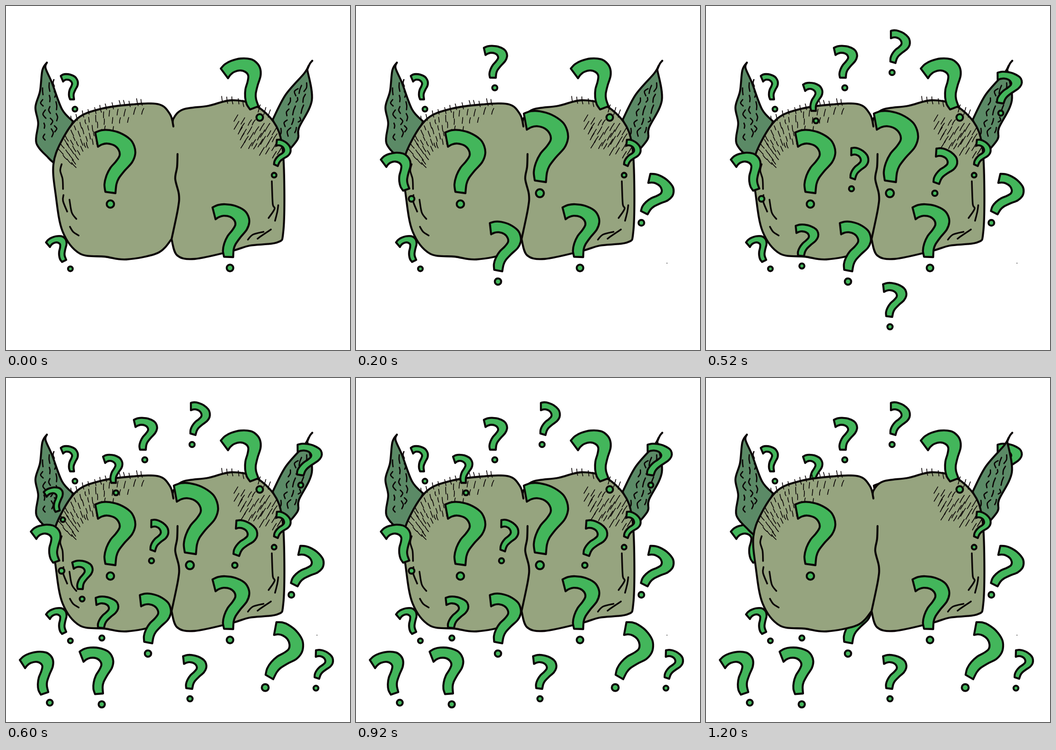
An HTML page that plays this animation: 748 by 748 pixels, repeating every 1400 ms.

```html
<!DOCTYPE html>
<html lang="en">
<head>
<meta charset="utf-8">
<title>Puzzled head</title>
<style>
html, body { margin: 0; width: 100%; height: 100%; overflow: hidden; background: #fff; }
svg { display: block; width: 100%; height: 100%; }
path, circle { fill: none; stroke: #0b0506; stroke-width: 4.3; stroke-linecap: round; stroke-linejoin: round; }
.fold { stroke-width: 3.6; }
.vein { stroke-width: 2.8; }
.hair { stroke-width: 1.7; }
.ear { fill: #5b8a66; }
.skin { fill: #96a47f; }
.mark { fill: #43b65b; }
</style>
</head>
<body>
<svg id="stage" viewBox="0 0 748 748"></svg>
<script>
const NS = 'http://www.w3.org/2000/svg';
const LOOP = 1400;
const stage = document.getElementById('stage');

let seed = 11;
function rand(lo, hi) {
  seed = (seed * 16807) % 2147483647;
  return lo + (hi - lo) * seed / 2147483647;
}

function add(parent, tag, attrs = {}) {
  const el = document.createElementNS(NS, tag);
  for (const k in attrs) el.setAttribute(k, attrs[k]);
  return parent.appendChild(el);
}

const points = text => text.split(' ').map(s => s.split(',').map(Number));

// Smooth curve through the points, without the leading move.
function curve(p) {
  let d = p[0].join(' ');
  for (let i = 0; i < p.length - 1; i++) {
    const a = p[i - 1] || p[i], b = p[i], c = p[i + 1], e = p[i + 2] || c;
    const c1 = b.map((v, k) => v + (c[k] - a[k]) / 6);
    const c2 = c.map((v, k) => v - (e[k] - b[k]) / 6);
    d += ` C${c1} ${c2} ${c}`;
  }
  return d;
}

// Several curves meet in corners.
function draw(g, cls, curves, end = '') {
  add(g, 'path', { class: cls, d: 'M' + curves.map(curve).join('L') + end });
}
const shape = (g, cls, ...texts) => draw(g, cls, texts.map(points), 'Z');
const line = (g, cls, text) => draw(g, cls, [points(text)]);

// One question mark: x to the right of the line from head to tail, y along it.
const outer = points('0,0 .107,-.002 .223,.036 .366,.13 .484,.275 .511,.398 .486,.518 .398,.625 .248,.711 .12,.798 .057,.875 0,1');
const inner = points('-.143,.93 -.12,.816 -.052,.702 .05,.6 .164,.532 .248,.461 .261,.375 .216,.284 .123,.223 .043,.211 -.03,.225');

function drawMark(g, [x, y, tailX, tailY, wide]) {
  const dx = tailX - x, dy = tailY - y, len = Math.hypot(dx, dy);
  const place = ([u, v]) => [x + u * wide * dy + v * dx, y - u * wide * dx + v * dy];
  draw(g, 'mark', [outer.map(place), inner.map(place)], 'Z');
  const turn = Math.atan2(dy, dx) + 0.113, reach = len + 20;
  add(g, 'circle', {
    class: 'mark', r: 3 + 0.036 * len,
    cx: x + reach * Math.cos(turn), cy: y + reach * Math.sin(turn)
  });
}

// Marks: head x, y, tail x, y, relative width
const groups = [
  { from: 0, back: LOOP, marks: [
    [119, 152, 148, 203, .9], [467, 136, 549, 218, 1.08], [194, 275, 238, 407, 1],
    [589, 291, 591, 348, 1], [449, 438, 494, 546, 1.08], [87, 514, 131, 552, 1.13]
  ] },
  { from: 200, back: 1200, speck: true, marks: [
    [278, 91, 304, 156, 1.17], [54, 334, 116, 397, 1.02], [365, 234, 413, 383, .98],
    [640, 365, 634, 453, 1.18], [291, 472, 318, 577, 1.04]
  ] },
  { from: 400, back: 1000, marks: [
    [402, 54, 412, 124, 1.04], [211, 171, 239, 228, 1], [634, 145, 647, 212, 1.38],
    [316, 309, 324, 377, .97], [501, 310, 507, 387, 1.09], [195, 478, 213, 544, 1.23],
    [385, 605, 405, 676, 1.16]
  ] },
  { from: 600, back: 800, marks: [
    [82, 248, 117, 288, 1.19], [144, 401, 167, 459, 1.15], [30, 613, 92, 683, 1.18],
    [160, 595, 211, 686, 1.06], [588, 531, 581, 655, .96], [674, 592, 681, 654, 1.08]
  ] }
];

// Short wavy strokes along an ear, spread across its width.
function veins(g, [tipX, tipY], [baseX, baseY], width) {
  const dx = baseX - tipX, dy = baseY - tipY, len = Math.hypot(dx, dy);
  const ux = dx / len, uy = dy / len;
  for (let i = 0; i < 15; i++) {
    const t = 0.24 + 0.046 * i;
    const side = (i % 3 - 1) * width * Math.sin(Math.PI * Math.min(t, 0.6)) + rand(-3, 3);
    const x = tipX + dx * t - uy * side, y = tipY + dy * t + ux * side;
    const size = rand(5, 10), bend = rand(-3, 3);
    const at = (s, b) => [x + ux * s - uy * b, y + uy * s + ux * b];
    draw(g, 'vein', [[at(-size, bend), at(0, -bend), at(size, bend)]]);
  }
}

function hair(g, x, y, dx, dy) {
  x += rand(-3, 3);
  y += rand(-3, 3);
  const len = rand(0.75, 1.2), bow = rand(-2, 1);
  add(g, 'path', { class: 'hair', d: `M${x} ${y}q${dx * len / 2 + bow} ${dy * len / 2} ${dx * len} ${dy * len}` });
}

function drawHair(g) {
  // left crown: rows below an arc, lying flatter towards the cheek
  for (let row = 0; row < 4; row++) {
    const count = 16 - row * 2;
    for (let i = 0; i < count; i++) {
      const t = i / (count - 1) * (1 - row * 0.13), s = 1 - t;
      const x = 114 * s * s + 2 * 144 * s * t + 302 * t * t + row * 10 * s;
      const y = 312 * s * s + 2 * 222 * s * t + 222 * t * t + row * (19 - 9 * s);
      hair(g, x, y, 9 - 14 * t, 10 + 4 * t);
    }
  }
  for (let x = 140; x < 300; x += 13) {
    hair(g, x, 204 + 34 * ((300 - x) / 160) ** 2, 3, 13);
  }
  // right crown: slanted rows
  for (let row = 0; row < 5; row++) {
    for (let col = 0; col < 7; col++) {
      hair(g, 503 + col * 14 + row * 4, 238 + col * 4 + row * 14, -9, 15);
    }
  }
  for (let x = 469; x < 580; x += 12) {
    hair(g, x, 198 + 28 * ((x - 469) / 110) ** 2, x < 530 ? 2 : -4, 14);
  }
}

function drawHead(g) {
  shape(g, 'ear', '89,123 79,140 74,185 64,220 70,255 66,298 92,330 104,341', '146,251 122,225 100,167 86,135 89,123');
  shape(g, 'ear', '580,247 608,193 648,147 658,130', '655,138 665,205 637,265 634,290 605,325');
  line(g, '', '666,119 661,125 655,138');
  veins(g, [88, 125], [100, 305], 14);
  veins(g, [657, 135], [606, 300], 14);
  shape(g, 'skin',
    '364,262 357,236 333,214 275,214 205,224 155,245 120,295 103,345 108,410 123,490 160,538 215,545 262,551 330,537 360,507',
    '360,507 372,542 410,550 490,533 530,521 590,514 603,490 605,380 600,300 582,252 540,215 490,205 440,217 385,225 364,245 364,262');
  line(g, '', '373,322 372,350 368,376 376,410 374,440 360,507');
  [
    '121,344 118,358 123,376 124,398', '125,411 124,424 133,447', '138,421 143,449 153,463',
    '139,480 146,491 158,499', '578,381 580,430 584,441 571,461', '592,433 590,447 585,467',
    '526,508 537,497 560,491', '547,506 555,500 576,486'
  ].forEach(text => line(g, 'fold', text));
  drawHair(g);
}

// Shown only between two times of the loop, with hard changes.
function showBetween(el, start, end) {
  const a = start / LOOP, b = end / LOOP;
  const at = (offset, opacity) => ({ offset, opacity });
  el.animate([
    at(0, 0), at(a, 0), at(a, 1), at(b, 1), at(b, b < 1 ? 0 : 1), at(1, b < 1 ? 0 : 1)
  ], { duration: LOOP, iterations: Infinity });
}

function drawGroup(layer, group, start, end) {
  if (start >= end) return;
  const g = add(layer, 'g');
  group.marks.forEach(m => drawMark(g, m));
  if (group.speck) add(g, 'rect', { x: 675.5, y: 558.5, width: 1.5, height: 1.5 });
  if (end - start < LOOP) showBetween(g, start, end);
}

const [behind, head, front] = [0, 1, 2].map(() => add(stage, 'g'));
drawHead(head);
for (const group of groups) {
  drawGroup(front, group, group.from, group.back);
  drawGroup(behind, group, group.back, LOOP);
}
</script>
</body>
</html>
```
